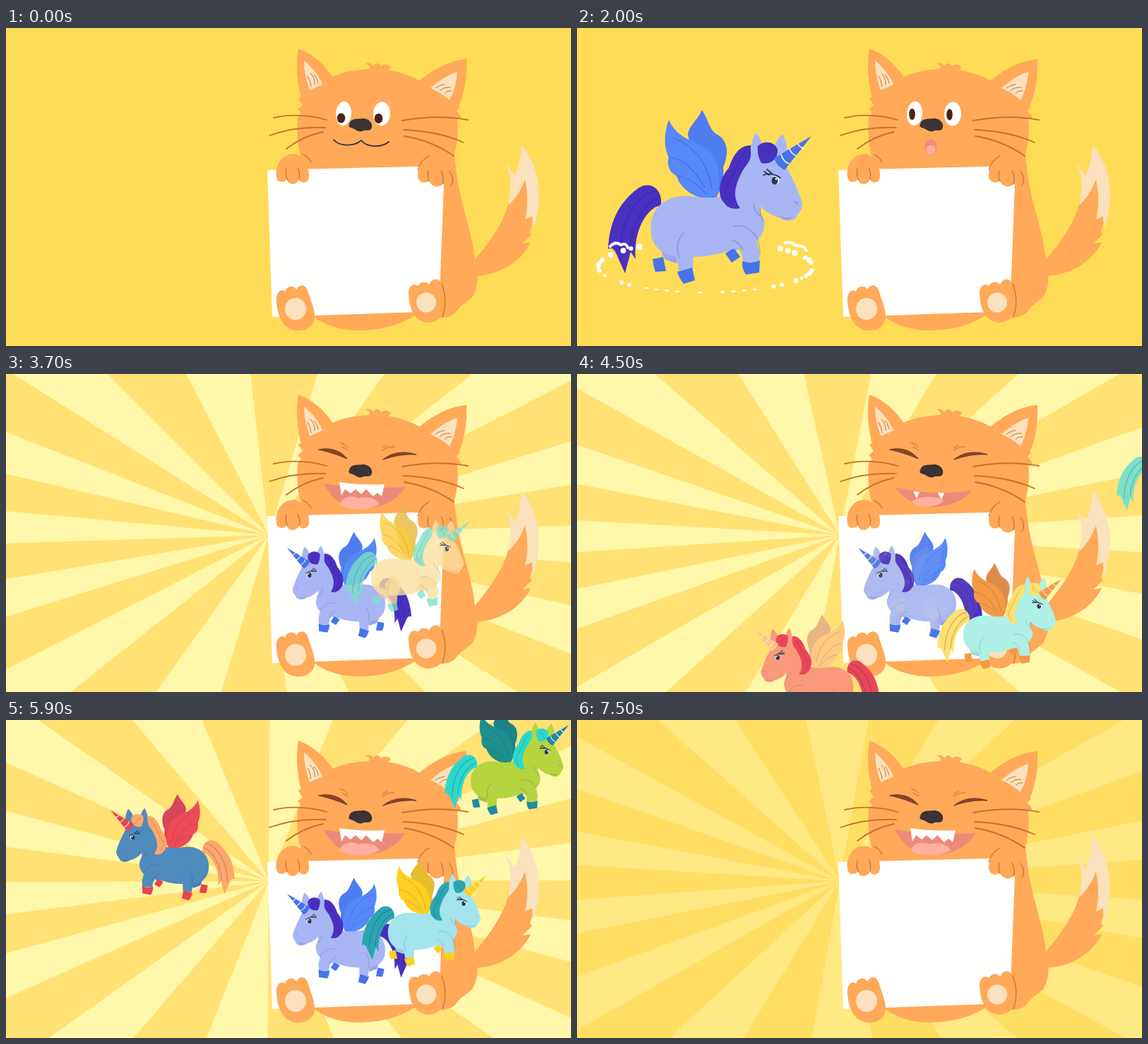
An HTML page with a canvas for the animation above (8 s loop, 800 by 450 pixels).

```html
<!DOCTYPE html>
<html lang="en">
<head>
<meta charset="utf-8">
<title>Cat and unicorns</title>
<style>
html, body { margin: 0; width: 100%; height: 100%; overflow: hidden; background: #ffdc57; }
canvas { display: block; width: 800px; height: 450px; }
</style>
</head>
<body>
<canvas id="stage" width="800" height="450"></canvas>
<script>
const ctx = document.getElementById('stage').getContext('2d');
const ORANGE = '#ffa959', CREAM = '#fbe1bd', BROWN = '#c8722c', WHITE = '#fffffd', DARK = '#3b3335';
const SHADE = 'rgba(35,30,120,.28)';
const LOOP = 8000, RUNS = [[500, 1500], [2000, 2800], [3300, 7500]];
const clamp = v => Math.max(0, Math.min(1, v));

function fill(d, color) { ctx.fillStyle = color; ctx.fill(new Path2D(d)); }
function line(d, color, width) {
  ctx.strokeStyle = color; ctx.lineWidth = width; ctx.lineCap = ctx.lineJoin = 'round';
  ctx.stroke(new Path2D(d));
}
function oval(x, y, rx, ry, color, turn = 0) {
  ctx.fillStyle = color; ctx.beginPath(); ctx.ellipse(x, y, rx, ry, turn, 0, 7); ctx.fill();
}

// The picture advances in 200 ms steps, with pauses between the runs.
function stepped(ms) {
  let t = 0;
  for (const [from, to] of RUNS)
    if (ms >= from) t = Math.min(to, from + Math.floor((ms - from) / 200) * 200);
  return t / 1000;
}

// A turning sunburst, stretched to the shape of the stage.
function rays(t) {
  const count = 14, half = 6.2;
  ctx.save();
  ctx.globalAlpha = t > 7.4 ? .45 : clamp((t - 3.2) / .25);
  ctx.fillStyle = '#ffe174'; ctx.fillRect(0, 0, 800, 450);
  ctx.fillStyle = '#fff7a9';
  ctx.translate(372, 228); ctx.scale(16 / 9, 1);
  for (let i = 0; i < count; i++) {
    const mid = 183 - 4.3 * (t - 3.7) + 360 * i / count;
    ctx.beginPath(); ctx.moveTo(0, 0);
    for (const side of [-half, half]) {
      const a = (mid + side) * Math.PI / 180;
      ctx.lineTo(900 * Math.cos(a), 900 * Math.sin(a));
    }
    ctx.fill();
  }
  ctx.restore();
}

function catBody() {
  fill('M662 330C688 300 707 270 711 248L735 213L746 275C743 285 740 290 745 291C741 296 736 300 731 305L743 303C730 330 700 350 662 351Z', ORANGE);
  fill('M730 165C752 190 764 238 746 284L745 266L735 271C740 250 738 230 735 214C730 228 722 241 711 251C715 230 717 213 708 192L720 209C727 196 729 180 730 165Z', CREAM);
  fill('M425 170L632 165C637 190 637 205 641 225C648 262 662 297 664 330C670 352 668 368 660 381C650 390 645 392 640 398C634 407 626 410 616 410L578 407C550 425 520 428 497 428C466 427 442 417 430 402Z', ORANGE);
  fill('M462 69C482 60 505 58 525 58C550 59 572 66 588 76L632 105L643 111L638 117L645 126L639 129C641 150 639 165 633 185L628 200H426C413 180 411 153 413 126L418 120L413 115L420 109L414 100Z', ORANGE);
  fill('M414 29C437 38 452 53 463 70L440 96L419 104C412 78 410 50 414 29Z', ORANGE);
  fill('M652 44C653 70 649 94 640 113L585 75C604 59 627 46 652 44Z', ORANGE);
  fill('M510 62L516 55L509 50Q517 48 520 54Q526 46 531 54Q538 49 545 55L538 64Z', ORANGE);
  fill('M422 46C434 56 443 67 448 80L430 88C425 74 422 60 422 46Z', CREAM);
  fill('M639 62C638 77 634 91 628 102Q615 91 601 85C613 75 625 66 639 62Z', CREAM);
  line('M432 83Q431 74 427 68M437 80Q438 71 431 64M442 78Q440 70 436 66M608 85Q616 80 621 80M614 89Q620 83 629 84M621 93Q624 88 631 89', BROWN, 1);
}

function catPaws() {
  fill('M383 211C380 194 391 178 407 178C421 179 430 196 429 211C428 220 417 221 415 214C412 223 399 223 398 214C393 220 384 219 383 211Z', ORANGE);
  fill('M583 207C584 191 597 179 612 179C625 180 635 196 634 212C633 223 624 227 619 220C613 227 602 225 599 216C591 222 582 217 583 207Z', ORANGE);
  line('M397 199Q395 209 399 215M413 198Q417 206 415 214M421 179Q429 183 432 190M598 202Q596 211 599 217M616 202Q621 212 618 221M628 203Q636 214 630 223M583 201Q587 187 599 181', BROWN, 1.2);
  fill('M383 388C381 374 390 368 395 373C398 364 408 364 411 370C417 360 426 364 428 374C432 387 438 400 437 411C433 433 402 433 392 417C386 408 384 399 383 388Z', ORANGE);
  fill('M570 376C570 363 578 361 583 365C588 358 595 358 599 363C604 352 615 354 616 363C622 376 624 392 619 404C610 421 588 420 579 407C572 398 571 388 570 376Z', ORANGE);
  line('M617 362Q626 386 618 409', BROWN, 1.2);
  oval(410, 397.5, 15, 15.5, CREAM);
  oval(595, 388.5, 14, 14, CREAM);
}

function openEyes(surprised) {
  oval(478, 121, 11, 17, '#fff', .08);
  oval(532, 121.5, 12, 17, '#fff', .05);
  const y = surprised ? 122 : 127.5, rx = surprised ? 4.3 : 5.8, ry = surprised ? 8 : 7;
  oval(474.5, y, rx, ry, '#4b211b');
  oval(527.5, y + .5, rx, ry, '#4b211b');
}

function laughingEyes() {
  const lids = 'M443 107C459 103 475 109 483 120C469 114 457 110 443 107ZM534 121C546 111 563 108 581 114C563 113 549 116 534 121Z';
  fill(lids, '#8c4429');
  line(lids, '#6b3a25', 1);
  line('M473 97Q480 99 484 104M476 103L484 108M533 108Q541 102 550 103M534 104L540 101', BROWN, 1);
}

function laugh(wide) {
  if (wide) {
    fill('M450 155C485 161 530 162 565 160C553 180 530 191 503 191C478 190 462 178 450 155Z', '#ec8a79');
    fill('M472 184C478 172 492 172 500 176C513 172 525 177 529 184C515 194 485 194 472 184Z', '#ffb0a0');
    fill('M472 153Q505 158 536 156L532 173L526 168L520 173L510 163L503 170L495 163L488 169L480 163L475 172Z', '#fff');
  } else {
    fill('M450 160C485 170 530 169 559 165C547 181 523 188 502 188C480 187 463 177 450 160Z', '#ec8a79');
    fill('M474 181C482 172 513 171 519 180C508 190 484 190 474 181Z', '#ffb0a0');
    fill('M476 166L485 167L481 176ZM511 168L520 168L516 178Z', '#fff');
  }
}

function catFace(t) {
  line('M379 127Q414 119 454 130M373 152Q410 139 452 141M397 171Q420 153 449 147M561 131Q610 122 654 130M563 144Q612 146 648 162M564 153Q602 159 634 181', BROWN, 1.8);
  if (t >= 3.3) {
    const n = Math.round((t - 3.3) / .2) % 6;
    laughingEyes();
    laugh(n > 0 && n < 4);
  } else if (t >= .9) {
    openEyes(true);
    oval(501, 168, 8.5, 11, '#ef8b7d');
    oval(501, 172, 6.5, 6.5, '#ffada0');
  } else {
    openEyes(false);
    line('M464 158C473 169 494 167 503 159C511 169 531 170 542 161', DARK, 1.8);
  }
  fill('M486 136C488 127 499 129 504 128C515 127 521 137 517 143C513 147 508 143 505 146C498 148 494 142 488 141C485 140 485 138 486 136Z', DARK);
}

// Palette: body, hair, wing, hoof.
function unicorn([body, hair, wing, hoof]) {
  const shaded = (d, color) => { fill(d, color); fill(d, 'rgba(20,20,140,.1)'); };
  fill('M119 251C122 226 101 215 85 228C59 248 46 274 44 313C50 308 55 316 58 325L68 347L76 317L83 327C80 296 92 264 112 253Z', hair);
  line('M111 230C82 237 62 275 61 318M116 240C92 250 77 282 75 314', SHADE, 1.8);
  shaded('M157 151C158 139 171 130 177 116C186 130 187 143 197 150C216 159 214 181 207 197C209 215 202 230 196 243L172 215Z', wing);
  fill('M195 243C168 243 146 228 141 209C130 205 127 191 130 183C122 167 124 145 130 130C140 153 158 157 177 167C203 180 207 219 195 243Z', wing);
  line('M130 183C152 185 169 204 181 226M141 209C159 211 173 224 184 235M137 156C165 166 186 192 191 228', SHADE, 1.2);
  shaded('M112 296L124 327L140 333L152 318Z', body);
  fill('M107 327L122 324L126 344L111 345Q108 337 107 327Z', hoof);
  shaded('M205 305L222 316L238 308L230 292Z', body);
  fill('M210 319L222 311L231 324L219 332Z', hoof);
  fill('M246 182C245 168 248 157 253 148C262 157 264 168 261 180ZM278 180C278 167 283 157 291 150C298 161 299 174 295 190Z', body);
  fill('M105 291C100 256 126 235 160 238C184 241 206 242 216 232C226 214 233 199 242 184C251 170 277 168 287 181C300 201 315 231 319 249C319 259 312 262 310 269C303 275 292 273 286 268C278 267 268 261 260 252C256 261 267 270 265 281C262 304 240 311 220 313C199 322 171 326 146 323C125 324 107 312 105 291Z', body);
  fill('M154 275C178 282 177 307 165 322L164 343L144 343C142 325 136 312 137 298Z', body);
  fill('M142 345L163 339L167 357L151 362Q145 355 142 345Z', hoof);
  fill('M214 280C239 274 262 294 258 331L235 331C234 316 230 309 216 307Z', body);
  fill('M234 330Q247 334 259 329L258 346L239 349Q233 340 234 330Z', hoof);
  line('M151 289C141 302 140 312 145 325M222 281C241 276 260 292 259 320M235 314Q230 303 219 300M260 254Q257 262 265 274M250 249Q251 261 259 265', SHADE, 1.2);
  fill('M246 166C229 166 221 181 215 198C201 213 197 237 209 248C213 255 222 257 231 255C219 238 225 222 231 209C236 196 246 190 246 180Z', hair);
  fill('M256 167C265 158 281 161 284 172C285 186 273 194 261 191C257 184 255 176 256 167Z', hair);
  line('M238 175C225 192 222 212 212 223Q205 236 217 247M263 172Q273 173 274 185', SHADE, 1.3);
  fill('M279 184L332 153L294 201Q283 196 279 184Z', hoof);
  line('M289 179Q292 189 300 192M301 171Q304 179 311 181M313 164Q315 169 321 170', '#eef0ff', 1.7);
  oval(281, 215.5, 5.5, 6, '#fff');
  oval(280, 216, 4.6, 5.6, '#293752');
  oval(282, 213.5, 1.4, 1.6, '#fff');
  line('M264 208Q277 204 288 212M265 203L272 208M269 200L276 206', '#293752', 1.8);
  line('M289 267Q296 272 304 268M308 246Q311 246 312 249', SHADE, 1.3);
}

// Small unicorn, shifted from its place on the sheet.
function smallUnicorn(palette, dx, dy, facing, alpha) {
  ctx.save();
  ctx.globalAlpha = alpha;
  ctx.translate((facing < 0 ? 398 : 578) + dx, 246 + dy);
  ctx.scale(.611 * facing, .611);
  ctx.translate(-332, -153);
  unicorn(palette);
  ctx.restore();
}

const BLUE = ['#a8b7f3', '#4930c1', '#5688fa', '#4774ea'];
// Birth time, speed in x and y, palette.
const flock = [
  [3.48, 355, -168, ['#fbdf9f', '#7be1c8', '#ffcb38', '#7be1c8']],
  [4.10, -364, 292, ['#fa9a7b', '#e9465a', '#ffca80', '#ffca80']],
  [4.20, 360, 147, ['#aef0e5', '#ffe06b', '#f39a43', '#f39a43']],
  [4.48, -300, -262, ['#fff0bd', '#ffe28d', '#fff1c8', '#ffd66c']],
  [5.10, 274, -299, ['#b5d43e', '#2cd8ce', '#1d908d', '#208aa5']],
  [5.20, -357, -169, ['#4f8bbd', '#ffa76b', '#ed4b56', '#e8454f']],
  [5.62, 364, -89, ['#a4e4ee', '#2ba6b1', '#ffcf22', '#ffcf22']],
  [5.92, -472, -6, ['#b8aeee', '#f74d4d', '#f88a6a', '#e9584f']],
  [5.93, -319, -332, ['#ffd052', '#ee59b1', '#f98aa0', '#2ab5d5']],
  [6.35, 389, -158, ['#ffae98', '#36c7ce', '#b058bf', '#9a50c0']]
];

function flyers(t) {
  for (const [born, vx, vy, palette] of flock) {
    const age = t - born;
    if (age > 0 && age < 2)
      smallUnicorn(palette, vx * age, vy * age, Math.sign(vx), clamp(age / .28) * (t > 7.2 ? .5 : 1));
  }
}

// A cloud that swells and breaks up into a ring of specks.
function puff(p) {
  const spread = .35 + .65 * Math.sqrt(p), cloud = 42 * Math.pow(1 - p, .8);
  if (p < .5) oval(182, 325, 140 * spread, 95 * spread * (1 - p), '#fff');
  for (let i = 0; i < 48; i++) {
    const a = (-52 + 284 * i / 47) * Math.PI / 180, sin = Math.sin(a);
    const noise = Math.abs(Math.sin(i * 12.99) * 437.5) % 1;
    if (noise < .2 && p > .6) continue;
    const speck = sin > .8 ? 1 + noise * .7 : 1.6 + noise * 2 + Math.max(0, -sin) * 1.2;
    oval(182 + 152 * spread * Math.cos(a), 338 + 36 * spread * sin,
      speck + cloud * (.5 + noise / 2) + (sin > .8 ? 2 : 0), speck + cloud * (.5 + noise / 2), '#fff');
  }
  if (p > .8) line('M47 309Q55 301 62 307Q69 303 72 311M294 304Q304 302 310 308Q321 307 325 315', '#fff', 4);
}

function draw(now) {
  const t = stepped(now % LOOP);
  ctx.fillStyle = '#ffdc57'; ctx.fillRect(0, 0, 800, 450);
  if (t >= 3.3) rays(t);
  catBody();
  fill('M370 201L621 195L613 401L377 409Z', WHITE);
  catPaws();
  catFace(t);
  if (t >= .9 && t < 3.3) unicorn(BLUE);
  if (t >= .5 && t < 2.2) puff(clamp(t - .5));
  if (t >= 3.3 && t < 7.5) {
    smallUnicorn(BLUE, 0, 0, -1, t > 7.2 ? .5 : clamp((t - 3.2) / .25));
    flyers(t);
  }
}

const start = performance.now();
function tick() {
  draw(performance.now() - start);
  requestAnimationFrame(tick);
}
tick();
</script>
</body>
</html>
```
